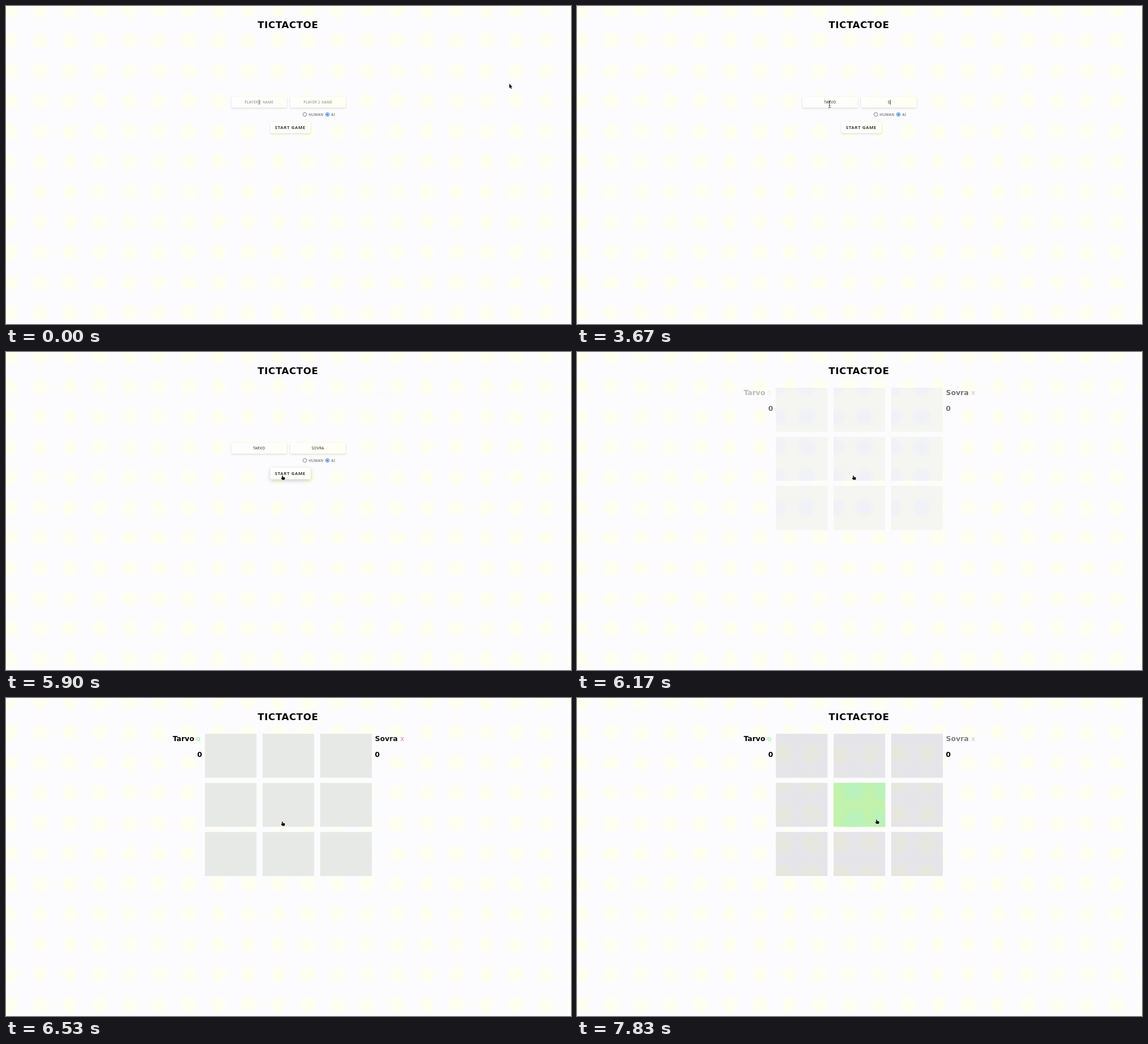
An HTML page with a canvas for the animation above (8000 ms loop, 998 by 561 pixels).

```html
<!DOCTYPE html>
<html lang="en">
<head>
<meta charset="utf-8">
<title>Board game</title>
<style>
html, body { margin: 0; width: 100%; height: 100%; overflow: hidden; background: #fcfcfe; }
canvas { display: block; }
</style>
</head>
<body>
<canvas id="stage" width="998" height="561"></canvas>
<script>
const W = 998, H = 561, LOOP = 8000;
const ctx = document.getElementById('stage').getContext('2d');
const SANS = '"Noto Sans", "Open Sans", sans-serif';
const BOLD = '"DejaVu Sans", sans-serif';
const P1 = 'Tarvo', P2 = 'Sovra';

const clamp = u => Math.max(0, Math.min(1, u));
const ramp = (t, a, b) => clamp((t - a) / (b - a));
const smooth = u => u * u * (3 - 2 * u);
const lerp = (a, b, u) => a + (b - a) * u;
const rgba = (c, a = 1) => `rgba(${c.map(Math.round)},${a})`;

// Value at time t between keyframes [time, ...values]
function track(keys, t) {
  if (t <= keys[0][0]) return keys[0].slice(1);
  for (let i = 1; i < keys.length; i++) {
    const a = keys[i - 1], b = keys[i];
    if (t < b[0]) {
      const u = smooth(ramp(t, a[0], b[0]));
      return a.slice(1).map((v, k) => lerp(v, b[k + 1], u));
    }
  }
  return keys[keys.length - 1].slice(1);
}

function blob(g, x, y, r, color, alpha = 1) {
  const fill = g.createRadialGradient(x, y, 0, x, y, r);
  fill.addColorStop(0, rgba(color, alpha));
  fill.addColorStop(0.5, rgba(color, alpha * 0.9));
  fill.addColorStop(1, rgba(color, 0));
  g.fillStyle = fill;
  g.fillRect(x - r, y - r, 2 * r, 2 * r);
}

function makeBackdrop() {
  const c = document.createElement('canvas');
  c.width = W;
  c.height = H;
  const g = c.getContext('2d');
  g.fillStyle = '#fcfcfe';
  g.fillRect(0, 0, W, H);
  for (let i = 0; i < 20; i++)
    for (let j = 0; j < 11; j++)
      blob(g, 7.5 + i * 52.55, 7.5 + j * 53.4, 18, [255, 255, 239]);
  return c;
}
const backdrop = makeBackdrop();

function text(str, x, y, font, color, spacing = 0, align = 'left') {
  ctx.font = font;
  ctx.letterSpacing = spacing + 'px';
  ctx.textAlign = align;
  ctx.fillStyle = color;
  ctx.fillText(str, x, y);
}

function panel(x, y, w, h, from, to, lift = 0) {
  const fill = ctx.createLinearGradient(x, 0, x + w, 0);
  fill.addColorStop(0, from);
  fill.addColorStop(1, to);
  ctx.save();
  ctx.shadowColor = `rgba(0,0,0,${0.17 + lift * 0.03})`;
  ctx.shadowBlur = 3 + lift * 4;
  ctx.shadowOffsetY = 1 + lift * 1.5;
  ctx.fillStyle = fill;
  ctx.beginPath();
  ctx.roundRect(x, y, w, h, 2);
  ctx.fill();
  ctx.restore();
}

function field(cx, value, hint, focused) {
  const spacing = value ? 0.45 : 0.38;
  const font = '6.24px ' + SANS;
  ctx.font = font;
  ctx.letterSpacing = spacing + 'px';
  const str = value || hint, w = ctx.measureText(str).width;
  text(str, cx - w / 2, 172, font, value ? '#222' : '#85858a', spacing);
  if (focused) {
    ctx.fillStyle = '#222';
    ctx.fillRect(value ? cx + w / 2 : cx - 0.4, 165.5, 0.9, 8.5);
  }
}

function radio(x, on) {
  ctx.strokeStyle = on ? '#3f86dc' : '#76767c';
  ctx.fillStyle = '#fff';
  ctx.lineWidth = 1;
  ctx.beginPath();
  ctx.arc(x, 191.3, 3.3, 0, 7);
  ctx.fill();
  ctx.stroke();
  if (!on) return;
  ctx.fillStyle = '#3f86dc';
  ctx.beginPath();
  ctx.arc(x, 191.3, 1.9, 0, 7);
  ctx.fill();
}

const typed = (word, times, t) =>
  word.toUpperCase().slice(0, times.filter(s => t >= s).length);

function drawForm(t) {
  panel(398, 160, 98, 19.5, '#fdfdfe', '#fefef8');
  panel(502, 160, 98, 19.5, '#fefefb', '#fffff3');
  field(447, typed(P1, [2570, 2770, 2870, 2970, 3070], t), 'PLAYER 1 NAME', t < 3270);
  field(551, typed(P2, [3670, 3900, 3970, 4030, 4100], t), 'PLAYER 2 NAME', t >= 3270 && t < 4270);
  radio(527.8, false);
  radio(567.7, true);
  text('HUMAN', 534.6, 193.7, '6.24px ' + SANS, '#4a4a4e', 0.5);
  text('AI', 574.6, 193.7, '6.24px ' + SANS, '#4a4a4e', 0.5);
  panel(467, 204, 71, 20.5, '#fefefc', '#fefef7', smooth(ramp(t, 5430, 5600)));
  text('START GAME', 475, 216.6, '600 7.8px ' + SANS, '#38383c', 0.6);
}

const cellColor = [
  [6000, 252, 252, 252], [6300, 240, 242, 233],
  [6530, 231, 233, 230], [6770, 229, 229, 233]
];
// Column-centre cells touched by the pointer: [row, enter, leave]
const hovers = [[1, 7230, 7340], [0, 7340, 7410], [1, 7410, 7510], [2, 7510, 7640], [1, 7640, 9000]];

function hoverAmount(row, t) {
  return hovers.filter(h => h[0] === row).reduce((m, h) =>
    Math.max(m, ramp(t, h[1], h[1] + 100) * (1 - ramp(t, h[2], h[2] + 100))), 0);
}

function drawCell(col, row, t) {
  const x = 351.2 + col * 101.9, y = 63 + row * 86.6, w = 91.5, h = 77.8;
  const lilac = ramp(t, 6050, 6300) * (1 - ramp(t, 6330, 6500));
  const yellow = ramp(t, 6600, 7000);
  ctx.save();
  ctx.beginPath();
  ctx.rect(x, y, w, h);
  ctx.clip();
  ctx.fillStyle = rgba(track(cellColor, t));
  ctx.fillRect(x, y, w, h);
  for (let i = 0; i < 2; i++)
    for (let j = 0; j < 5; j++) {
      if (lilac) blob(ctx, x + 3 + i * 51, 61 + j * 53.3, 20, [235, 235, 255], lilac);
      if (yellow) blob(ctx, x + 13 + i * 50, 99 + j * 52.6, 21, [231, 231, 217], yellow * 0.75);
    }
  const green = col === 1 ? hoverAmount(row, t) : 0;
  if (green) {
    ctx.globalAlpha = green;
    ctx.fillStyle = '#c2f2ab';
    ctx.fillRect(x, y, w, h);
    for (let i = 0; i < 2; i++)
      for (let j = 0; j < 2; j++)
        blob(ctx, x + 37 + i * 52, y + 12 + j * 55, 25, [184, 242, 190], 0.9);
  }
  ctx.restore();
}

function drawGame(t) {
  const fade = smooth(ramp(t, 5870, 6440));
  const turn1 = lerp(0.5, 1, smooth(ramp(t, 6270, 6520)));
  const turn2 = lerp(1, 0.5, smooth(ramp(t, 6410, 6900)));
  const bold = 'bold 12.4px ' + BOLD, plain = '12.4px ' + BOLD;
  ctx.globalAlpha = fade * turn1;
  text(P1, 332.4, 76, bold, '#000', 0, 'right');
  text('o', 336.1, 76, plain, '#90ee90');
  ctx.globalAlpha = fade * turn2;
  text(P2, 651.8, 76, bold, '#000');
  text('x', 696.2, 76, plain, '#d673dc');
  ctx.globalAlpha = fade;
  text('0', 346.3, 104, bold, '#000', 0, 'right');
  text('0', 651.4, 104, bold, '#000');
  ctx.globalAlpha = 1;
  if (t >= 6000)
    for (let i = 0; i < 9; i++) drawCell(i % 3, Math.floor(i / 3), t);
}

const pointerPath = [
  [870, 889, 137], [1400, 397, 165], [1570, 421, 156], [1730, 421, 156], [1830, 447, 173],
  [2200, 447, 173], [2270, 446, 173.5], [5170, 446, 173.5], [5600, 489, 221.5],
  [7230, 489, 221.5], [7370, 505, 125], [7570, 522, 258], [7760, 530, 218]
];

const shapes = {
  arrow: 'M0 0 L0 8 L1.8 6.4 L3.1 9.2 L4.4 8.6 L3.2 5.9 L5.5 5.7 Z',
  beam: 'M-2 -6 Q-.2 -6 0 -5 Q.2 -6 2 -6 M0 -5 V5 M-2 6 Q-.2 6 0 5 Q.2 6 2 6 M-1.2 1.5 H1.2',
  hand: 'M-1.6 -3.2 Q-.8 -4 0 -3.2 L.2 -.9 L3 -.5 Q4 0 3.8 1.3 L3.2 4 H-1.2 L-3.2 1.2 Q-3 .2 -1.6 .8 Z'
};
for (const k in shapes) shapes[k] = new Path2D(shapes[k]);

function drawPointer(t) {
  const [x, y] = track(pointerPath, t);
  const inField = x > 398 && x < 496 && y > 154 && y < 182;
  const kind = t < 5000 ? (inField ? 'beam' : 'arrow')
    : inField && t < 5500 ? 'beam' : t < 5430 ? 'arrow' : 'hand';
  ctx.save();
  ctx.translate(x, y);
  ctx.lineJoin = 'round';
  if (kind === 'beam') {
    ctx.strokeStyle = '#333';
    ctx.lineWidth = 0.9;
    ctx.stroke(shapes.beam);
  } else {
    ctx.strokeStyle = 'rgba(255,255,255,.8)';
    ctx.lineWidth = 1;
    ctx.stroke(shapes[kind]);
    ctx.fillStyle = '#111';
    ctx.fill(shapes[kind]);
  }
  ctx.restore();
}

function draw(t) {
  ctx.globalAlpha = 1;
  ctx.drawImage(backdrop, 0, 0);
  text('TICTACTOE', 444.6, 39, 'bold 16.64px ' + BOLD, '#000', 0.6);
  if (t < 6000) drawForm(t);
  if (t > 5870) drawGame(t);
  drawPointer(t);
}

const start = performance.now();
function tick() {
  draw((performance.now() - start) % LOOP);
  requestAnimationFrame(tick);
}
tick();
</script>
</body>
</html>
```
